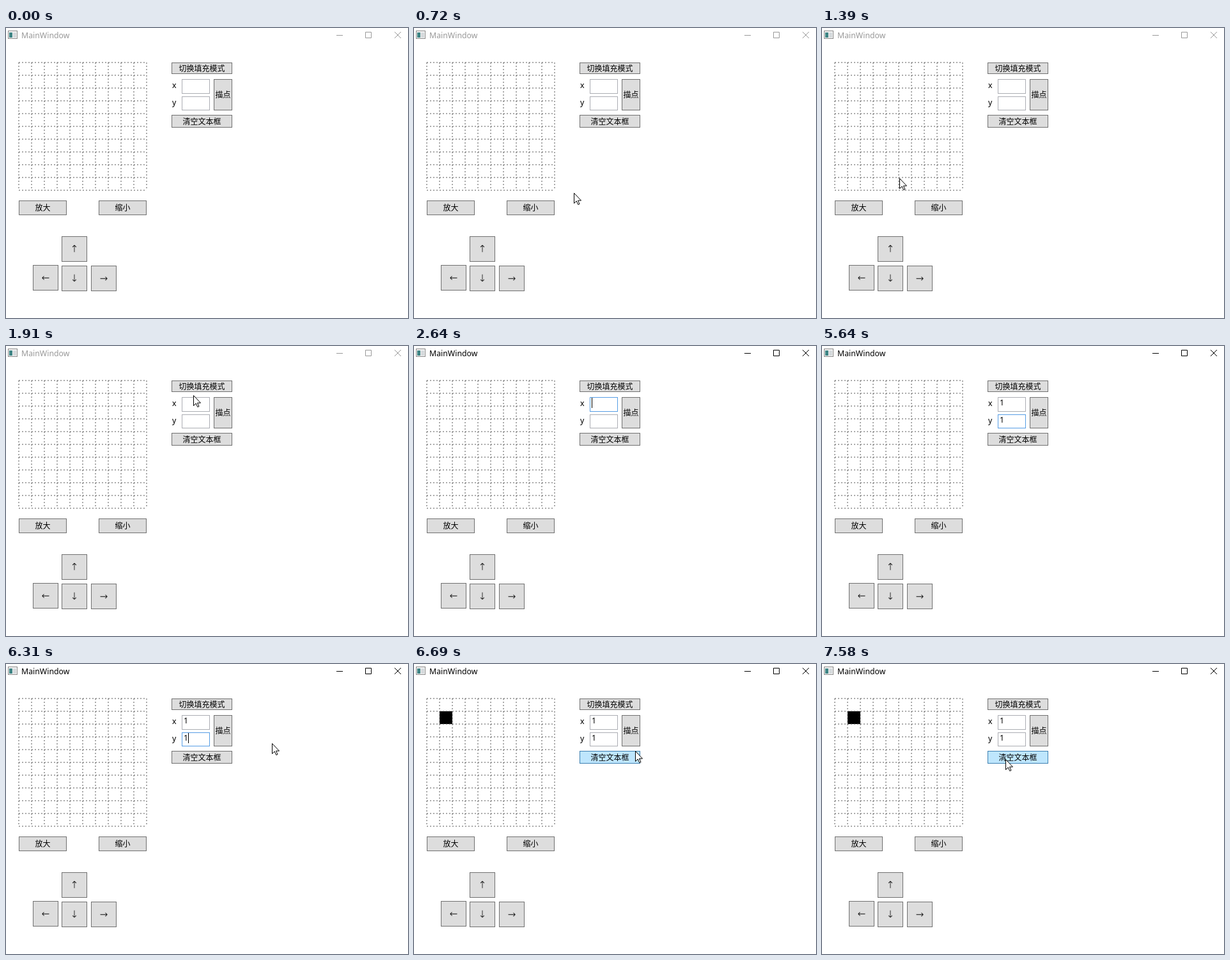
Write an HTML page that moves like this. It is 629 by 454 pixels and loops after 8 s.

```html
<!DOCTYPE html>
<html>
<head>
<meta charset="utf-8">
<style>
html, body { margin: 0; width: 100%; height: 100%; overflow: hidden; background: #fff; }
svg { display: block; }
text { font: 12px "Noto Sans CJK SC", "Noto Sans CJK", "Noto Sans", sans-serif; }
.latin { font: 12.3px "Noto Sans", "Open Sans", sans-serif; }
.label { font: 500 12.3px "Noto Sans", "Open Sans", sans-serif; }
.arrow { font: 15.5px "DejaVu Sans", sans-serif; stroke: #ddd; stroke-width: .4; }
.mid { text-anchor: middle; }
</style>
</head>
<body>
<svg id="stage" width="629" height="454" viewBox="0 0 629 454"></svg>
<script>
const LOOP = 8000, STEP = 74, BLINK = 540;
const CLICK = 6480;
const stage = document.getElementById('stage');

function add(tag, attrs, text = '') {
  const el = document.createElementNS('http://www.w3.org/2000/svg', tag);
  for (const name in attrs) el.setAttribute(name, attrs[name]);
  el.textContent = text;
  return stage.appendChild(el);
}

function box(x, y, w, h, fill, stroke) {
  const el = add('rect', { x: x + .5, y: y + .5, width: w - 1, height: h - 1, fill, stroke });
  const holds = p => p && p.x >= x && p.x < x + w && p.y >= y && p.y < y + h;
  return { el, holds };
}

function button(label, x, y, w, h, cls = '') {
  const b = box(x, y, w, h, '#ddd', '#707070');
  add('text', { x: x + w / 2, y: Math.round(y + h / 2 + 4.5), class: 'mid ' + cls }, label);
  return b;
}

function field(label, y, h) {
  add('text', { x: 260, y: y + 14, class: 'label' }, label);
  const f = box(275, y, 44, h, '#fff', '#abadb3');
  f.text = add('text', { x: 278, y: y + 13, class: 'latin' }, '1');
  f.caret = add('rect', { y: y + 1, width: 1, height: 16 });
  return f;
}

const show = (el, on) => el.setAttribute('visibility', on ? 'visible' : 'hidden');

// Title bar
add('rect', { x: 3.5, y: 4.5, width: 14, height: 12, fill: '#f4f4f4', stroke: '#8a8a8a' });
add('rect', { x: 5, y: 7, width: 5, height: 8, fill: '#3f8585' });
add('rect', { x: 11, y: 7, width: 5, height: 8, fill: '#d5d9dc' });
const title = add('text', { x: 24, y: 16, class: 'latin' }, 'MainWindow');
const controls = add('path', { d: 'M517 11.5h10M562.5 6.5h9v9h-9zM608 6l10 10M618 6l-10 10', fill: 'none' });

// Grid
const cell = add('rect', { x: 40, y: 74, width: 20, height: 20 });
let lines = '';
for (let i = 0; i <= 200; i += 20) lines += `M20 ${54 + i}h200M${20 + i} 54v200`;
add('path', { d: lines, stroke: '#555', 'stroke-dasharray': '2 3' });

// Controls
const buttons = [
  button('描点', 325, 80, 29, 49),
  button('切换填充模式', 259, 54, 95, 18),
  button('清空文本框', 259, 136, 95, 20),
  button('放大', 20, 270, 75, 23),
  button('缩小', 145, 270, 75, 23),
  button('↑', 87, 326, 40, 40, 'arrow'),
  button('←', 42, 371, 40, 40, 'arrow'),
  button('↓', 87, 372, 40, 40, 'arrow'),
  button('→', 133, 372, 40, 40, 'arrow')
];
const xField = field('x', 80, 23), yField = field('y', 107, 22);

const pointer = add('path', {
  d: 'M.5.5v16l3.7-3.6 2.6 5.6 2.2-1-2.5-5.4h5z', fill: '#fff', stroke: '#000'
});
const beam = add('path', { d: 'M-3 -7.5h2.5m1 0h2.5M.5 -7v15M-3 8.5h2.5m1 0h2.5', stroke: '#000', fill: 'none' });

// Mouse way points: time, x, y
const route = [
  [120, 579, 440], [860, 168, 213], [1160, 82, 257], [1320, 82, 257],
  [1390, 121, 235], [1740, 274, 69], [1910, 293, 77], [2430, 292, 100],
  [6030, 617, 148], [6330, 345, 115], [CLICK, 344, 118], [6690, 346, 136],
  [7000, 300, 159], [7210, 286, 157], [7440, 286, 155], [7580, 287, 149]
];

// The mouse is sampled at a fixed step and hidden while typing
function mouse(t) {
  if (t < 120 || (t >= 2430 && t < 6030)) return null;
  const i = route.findLastIndex(p => p[0] <= t);
  const [start, x, y] = route[i], [end, x2, y2] = route[i + 1] || [LOOP, x, y];
  const k = Math.floor((t - start) / STEP) * STEP / (end - start);
  return { x: Math.round(x + (x2 - x) * k), y: Math.round(y + (y2 - y) * k) };
}

function drawField(f, t, over, focusFrom, typedAt, focusTo) {
  const focused = t >= focusFrom && t < focusTo;
  const typed = t >= typedAt;
  const lit = (t - (typed ? typedAt : focusFrom)) % (2 * BLINK) < BLINK;
  f.el.setAttribute('stroke', focused ? '#569de5' : over ? '#7eb4ea' : '#abadb3');
  show(f.text, typed);
  show(f.caret, focused && lit);
  f.caret.setAttribute('x', typed ? 285 : 278);
}

function draw(t) {
  const p = mouse(t);
  const ink = t < 2350 ? '#999' : '#000';
  title.setAttribute('fill', ink);
  controls.setAttribute('stroke', ink);

  for (const b of buttons) {
    const over = b.holds(p);
    b.el.setAttribute('fill', over ? '#bee6fd' : '#ddd');
    b.el.setAttribute('stroke', over ? '#3c7fb1' : '#707070');
  }
  const inField = xField.holds(p);
  drawField(xField, t, inField, 2640, 3810, 4580);
  drawField(yField, t, false, 4580, 5100, CLICK);
  show(cell, t >= CLICK);

  show(pointer, p && !inField);
  show(beam, inField);
  if (p) (inField ? beam : pointer).setAttribute('transform', `translate(${p.x} ${p.y})`);
}

const began = performance.now();
function tick() {
  draw((performance.now() - began) % LOOP);
  requestAnimationFrame(tick);
}
draw(0);
requestAnimationFrame(tick);
</script>
</body>
</html>
```
